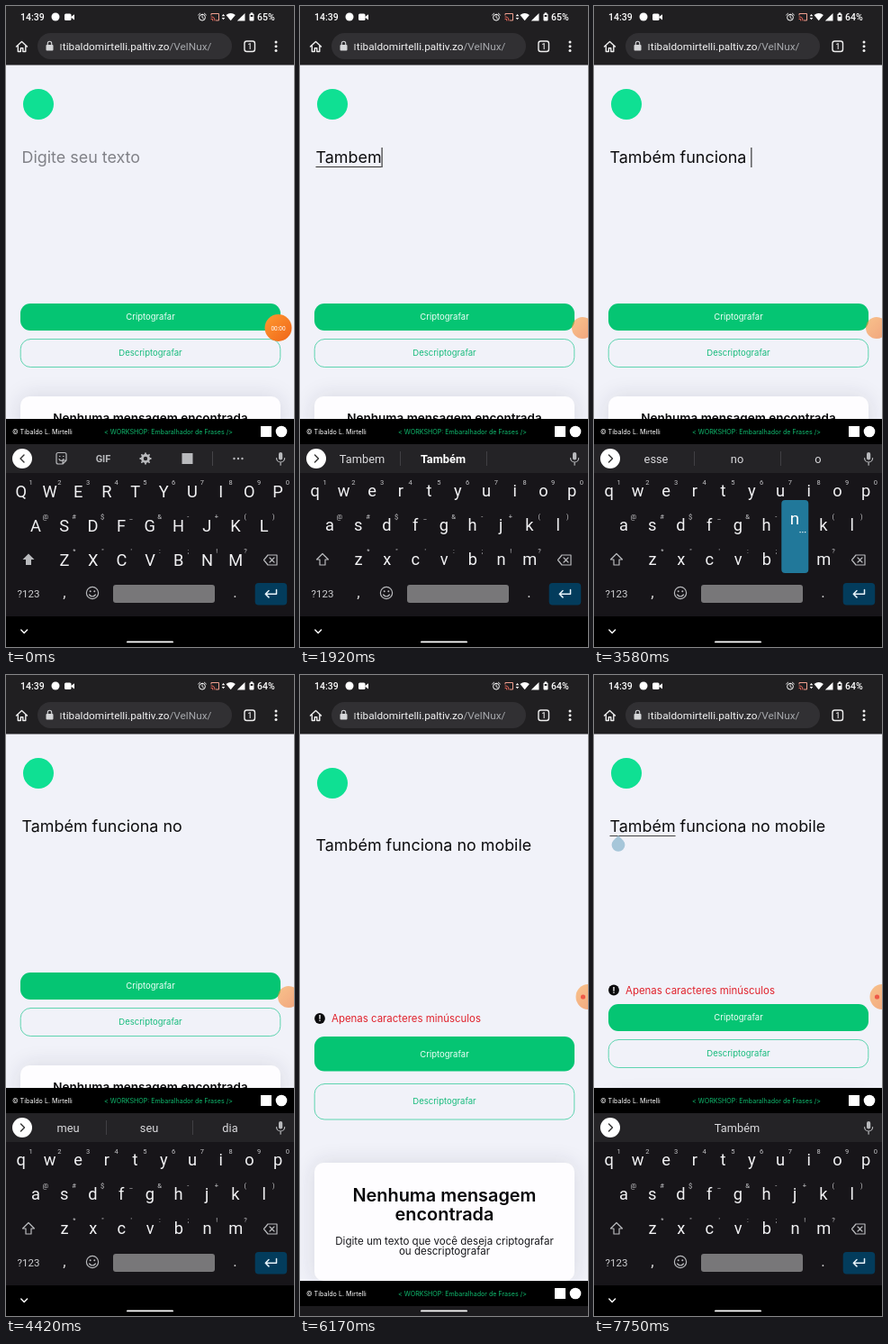
An HTML page with a canvas that plays this animation: 320x711 px, repeating every 8000 ms.

```html
<!DOCTYPE html>
<html lang="pt-BR">
<head>
<meta charset="utf-8">
<title>Digite seu texto</title>
<style>
html, body { margin: 0; width: 100%; height: 100%; overflow: hidden; background: #000; }
canvas { display: block; width: 320px; height: 711px; }
</style>
</head>
<body>
<canvas id="stage"></canvas>
<script>
const LOOP = 8000, W = 320, H = 711;
const canvas = document.getElementById('stage');
const dpr = window.devicePixelRatio || 1;
canvas.width = W * dpr;
canvas.height = H * dpr;
const c = canvas.getContext('2d');
c.scale(dpr, dpr);
c.lineCap = c.lineJoin = 'round';

const INTER = 'Inter, sans-serif', ROBOTO = 'Roboto, sans-serif';
const BAR = '#201f21', PAGE = '#f1f2f9', GREEN = '#05c573', ICON = '#b9babd';

// [time, character, suggestions, quick tap without key preview]
const EVENTS = [
  [500, 'T', 'T|Te|Tem'], [1080, 'a', 'Ta|Tá|Também'], [1250, 'm', 'Tam|Também|Tamo'],
  [1580, 'b', 'Tamb|*Também|'], [1670, 'e', 'Tambe|*Também|'], [1830, 'm', 'Tambem|*Também|'],
  [2165, ' ', 'é|não|tem'], [2420, 'f', 'f|te|tô'], [2755, 'u', 'fu|fui|eu'],
  [2835, 'n', 'fun|fim|fui'], [3000, 'c', 'func|funciona|fun'], [3080, 'i', 'funci|funciona|função'],
  [3165, 'o', 'funcio|funciona|função'], [3250, 'n', 'funcion|funciona|funcionar'],
  [3335, 'a', 'funciona|funcionar|funcionam'], [3500, ' ', 'esse|no|o'],
  [3665, 'n', 'n|no|não'], [3750, 'o', 'no|não|nos'], [3830, ' ', 'meu|dia|celular'],
  [4080, '', 'meu|seu|dia'], [4665, 'm', 'm|meu|mesmo'], [4750, 'o', 'mo|momento|modo'],
  [4915, 'b', 'mob|mobile|mon', 1], [5000, 'i', 'mobi|mobile|mobília'],
  [5080, 'l', 'mobil|mobile|mobília', 1], [5245, 'e', 'mobile'], [7420, '', 'Também']
];
const PRESS = 88, ERROR = 5750, CLOSED = 5830, TOUCH = 7250, REOPEN = 7580;

const LAYOUTS = {
  typing: { logo: 109, text: 174, top: 330, h: 30, top2: 369.5, h2: 31, card: 433, foot: 458 },
  error: { logo: 109, text: 174, err: 349.5, top: 365, h: 30, top2: 404.5, h2: 31, card: 469, foot: 458 },
  full: { logo: 120, text: 195, err: 381, top: 401, h: 38.5, top2: 453.5, h2: 39.5, card: 541, foot: 672 }
};

const ROWS = [
  { keys: 'qwertyuiop', hints: '1234567890', x: 16.8, y: 543.6 },
  { keys: 'asdfghjkl', hints: '@#$_&-+()', x: 33, y: 581.6 },
  { keys: 'zxcvbnm', hints: '*"\':;!?', x: 65, y: 619.8 }
];
const STEP = 31.7;

const span = (t, a, b) => Math.min(1, Math.max(0, (t - a) / (b - a)));
const mix = (a, b, p) => a + (b - a) * p;

function fill(d, color) { c.fillStyle = color; c.fill(new Path2D(d)); }
function line(d, color, width = 1.2) {
  c.strokeStyle = color;
  c.lineWidth = width;
  c.stroke(new Path2D(d));
}
function rect(x, y, w, h, color) { c.fillStyle = color; c.fillRect(x, y, w, h); }
function round(x, y, w, h, r, color, stroke) {
  c.beginPath();
  c.roundRect(x, y, w, h, r);
  if (stroke) { c.strokeStyle = color; c.lineWidth = stroke; c.stroke(); }
  else { c.fillStyle = color; c.fill(); }
}
function disc(x, y, r, color, stroke) {
  round(x - r, y - r, 2 * r, 2 * r, r, color, stroke);
}
function text(s, x, y, font, color, align = 'left') {
  c.font = font;
  c.fillStyle = color;
  c.textAlign = align;
  c.fillText(s, x, y);
  return c.measureText(s).width;
}

function drawBrowser(t) {
  rect(0, 0, W, 65.5, BAR);
  text('14:39', 16, 16, '500 10.5px ' + ROBOTO, '#fff');
  disc(55, 12, 4.5, '#fff');
  round(65, 8.5, 7.5, 7.5, 1.5, '#fff');
  fill('M72 12.2l4-3v6.2l-4-3z', '#fff');
  disc(218, 12.7, 3.4, '#fff', 1);
  line('M218 10.8v2l1.5 1M213.6 10l2-1.8M222.4 10l-2-1.8', '#fff', .9);
  line('M228 10v-1.5h8.5v7.5h-3', '#f0a090', 1);
  line('M228 12a4 4 0 0 1 4 4M228 14.2a1.8 1.8 0 0 1 1.8 1.8', '#e8685a', 1.1);
  fill('M239.7 11.3l1.8-2.3 1.8 2.3zM239.7 13l1.8 2.3 1.8-2.3z', '#fff');
  fill('M244.5 10q5.2-3.8 10.4 0l-5.2 6.2z', '#fff');
  fill('M265.5 8v8.4h-8.7z', '#fff');
  round(270.5, 8.5, 5, 8, 1, '#fff');
  rect(271.8, 7.4, 2.4, 1.5, '#fff');
  rect(271.7, 10, 2.6, 2, BAR);
  text(t < 2000 ? '65%' : '64%', 279, 16, '500 10.5px ' + ROBOTO, '#fff');

  line('M11.5 45l6-5.5 6 5.5M13.3 44v6.5h3v-3.7h2.5v3.7h3V44', '#eee', 1.4);
  round(35, 30, 216, 29, 14.5, '#313033');
  round(44.5, 43, 8, 6.5, 1, '#d5d6d8');
  line('M46.3 43v-1.6a2.2 2.2 0 0 1 4.4 0V43', '#d5d6d8', 1.1);
  rect(60.5, 42, 1, 7, '#ddd');
  const host = text('tibaldomirtelli.paltiv.zo', 62.8, 49, '11.8px ' + ROBOTO, '#f2f2f3');
  text('/VelNux/', 62.8 + host, 49, '11.8px ' + ROBOTO, '#a5a7ab');
  round(265, 39, 11.5, 11.5, 2.5, '#eee', 1.4);
  text('1', 270.8, 48, '500 8.5px ' + ROBOTO, '#eee', 'center');
  for (const y of [40, 44.7, 49.4]) disc(300, y, 1.5, '#eee');
}

function drawMessage(t, y) {
  const font = '17.92px ' + INTER;
  const done = EVENTS.filter(e => e[1] && t >= e[0]);
  const typed = done.map(e => e[1]).join('').replace('Tambem ', 'Também ');
  if (!typed) {
    text('Digite seu texto', 17.5, y, font, '#808187');
    return;
  }
  const width = text(typed, 17.5, y, font, '#0c0c0e');
  const measure = s => c.measureText(s).width;
  if (t < ERROR) {
    const start = measure(typed.slice(0, typed.lastIndexOf(' ') + 1));
    if (width > start) rect(17.5 + start, y + 4, width - start, 1, '#333');
    if ((t - done[done.length - 1][0]) % 1000 < 500) rect(17.5 + width, y - 17, 1, 22, '#111');
  }
  if (t >= 7420) rect(17.5, y + 4, measure('Também'), 1, '#444');
  if (t >= TOUCH) {
    if (t < 7750) rect(26.5, y - 17, 1, 21, '#111');
    fill(`M27 ${y + 4}l5.4 5.4a7.4 7.4 0 1 1 -10.8 0z`, '#a6c6d9');
  }
}

function drawPage(t, L) {
  const small = '9.5px ' + INTER, mid = 160.5;
  rect(0, 65, W, H - 65, PAGE);
  disc(36, L.logo, 17, '#0fe093');
  drawMessage(t, L.text);
  if (L.err) {
    disc(22, L.err, 5.9, '#0b0b0d');
    text('!', 22, L.err + 3.3, '700 9px ' + INTER, '#fff', 'center');
    text('Apenas caracteres minúsculos', 35, L.err + 4, '11.45px ' + INTER, '#e0222c');
  }
  round(16, L.top, 289, L.h, 11, GREEN);
  text('Criptografar', mid, L.top + L.h / 2 + 3.3, small, '#f2fff9', 'center');
  round(16.2, L.top2, 288.6, L.h2, 11, '#5fd4b0', 1);
  text('Descriptografar', mid, L.top2 + L.h2 / 2 + 3, small, '#16bb7c', 'center');

  c.save();
  c.shadowColor = 'rgba(30,30,60,.13)';
  c.shadowBlur = 24 * dpr;
  round(16, L.card, 289, 131, 10, '#fefdff');
  c.restore();
  if (L === LAYOUTS.full) {
    const title = '600 19.9px ' + INTER, body = '11.55px ' + INTER;
    text('Nenhuma mensagem', mid, 584, title, '#08080a', 'center');
    text('encontrada', mid, 605, title, '#08080a', 'center');
    text('Digite um texto que você deseja criptografar', mid, 631.5, body, '#18181c', 'center');
    text('ou descriptografar', mid, 642.5, body, '#18181c', 'center');
  } else {
    text('Nenhuma mensagem encontrada', mid, L.card + 29.3, '600 13.5px ' + INTER, '#08080a', 'center');
  }

  const f = L.foot;
  rect(0, f, W, 28, '#000');
  rect(0, f + 28, W, H - f - 28, '#1c1b1e');
  text('© Tibaldo L. Mirtelli', 7, f + 16.7, '7.2px ' + INTER, '#fff');
  text('< WORKSHOP: Embaralhador de Frases />', 180.5, f + 16.7, '7.1px ' + INTER, '#10bd70', 'center');
  rect(283, f + 8, 12, 12, '#fff');
  disc(306, f + 14, 6.3, '#fff');
}

function drawBall(t) {
  const p = span(t, 1000, 1250), late = t >= 5580;
  const x = late ? 320.5 : mix(302.5, 314, p), r = late ? 14 : mix(15, 12, p);
  const g = c.createLinearGradient(x - r, 357 - r, x + r, 357 + r);
  g.addColorStop(0, '#ff9b32');
  g.addColorStop(1, '#ef6418');
  c.globalAlpha = mix(1, .55, p);
  disc(x, 357, r, g);
  c.globalAlpha = 1;
  if (p === 0) text('00:00', x, 359.5, '6.5px ' + ROBOTO, '#fff', 'center');
  if (late) disc(314.5, 357, 2.6, '#ee5a48');
}

function drawToolbar() {
  line('M20 498l-4 4 4 4', '#333', 1.4);
  line('M56 497.5a2 2 0 0 1 2-2h7a2 2 0 0 1 2 2v6.5l-4 4h-5a2 2 0 0 1-2-2zM67 504h-2.5a1.5 1.5 0 0 0-1.5 1.5v2.5M59 502.5a2.6 2.6 0 0 0 5 0M59.5 499.5h.5M63.5 499.5h.5', ICON, 1.2);
  text('GIF', 108, 506, '700 11px ' + ROBOTO, ICON, 'center');
  disc(155, 502, 3.6, ICON, 2.8);
  for (let i = 0; i < 8; i++) {
    const a = i * Math.PI / 4, x = Math.cos(a), y = Math.sin(a);
    line(`M${155 + 5 * x} ${502 + 5 * y}L${155 + 5.8 * x} ${502 + 5.8 * y}`, ICON, 1.8);
  }
  rect(195.5, 496, 12, 12, ICON);
  rect(229, 494, 1, 16, '#454448');
  for (const x of [253.5, 258, 262.5]) disc(x, 502, 1.2, ICON);
}

function drawSuggestions(words) {
  line('M16.5 498l4 4-4 4', '#333', 1.4);
  const single = words.length === 1;
  words.forEach((w, i) => {
    const bold = w[0] === '*';
    const font = (bold ? '700 ' : '') + '12.8px ' + ROBOTO;
    text(w.replace('*', ''), single ? 159 : 69 + 90 * i, 506.5, font, bold ? '#fff' : '#d9d9dc', 'center');
  });
  if (!single) for (const x of [111, 207]) rect(x, 494, 1, 16, '#414044');
}

function drawKeys(t) {
  const caps = t < EVENTS[0][0];
  const next = EVENTS.find(e => e[1] && !e[3] && t < e[0] && t >= e[0] - PRESS);
  const held = next ? next[1].toLowerCase() : '';
  const show = k => caps ? k.toUpperCase() : k;

  for (const row of ROWS) [...row.keys].forEach((k, i) => {
    const x = row.x + STEP * i;
    text(show(k), x, row.y + (caps ? 1.2 : 0), '18.3px ' + ROBOTO, '#f1f1f3', 'center');
    text(row.hints[i], x + 10.8, row.y - 12.6, '7.5px ' + ROBOTO, '#c6c6c9', 'center');
  });

  const shift = 'M25 607.5l6.5 6.5h-3.5v6h-6v-6h-3.5z';
  if (caps) fill(shift, ICON); else line(shift, ICON, 1.2);
  line('M286.5 614.5l4.5-5.5h10v11h-10zM293 612l5 5M298 612l-5 5', ICON, 1.2);

  text('?123', 25, 655.5, '11.5px ' + ROBOTO, '#cfcfd2', 'center');
  text(',', 65, 656, '17px ' + ROBOTO, '#ddd', 'center');
  text('.', 254.5, 656, '17px ' + ROBOTO, '#ddd', 'center');
  disc(96, 651, 6.6, ICON, 1.2);
  disc(93.7, 649.3, 1, ICON);
  disc(98.3, 649.3, 1, ICON);
  line('M92.6 653q3.4 4 6.8 0', ICON, 1.2);
  round(119, 642, 113, 20, 3, held === ' ' ? '#979798' : '#787779');
  round(276.7, 640, 35.5, 24.5, 4, '#033c5c');
  line('M300.5 647.5v4.7h-12M292 648.5l-3.7 3.7 3.7 3.7', '#e8f3fa', 1.5);

  for (const row of ROWS) {
    const i = held ? row.keys.indexOf(held) : -1;
    if (i < 0) continue;
    const x = row.x + STEP * i;
    round(x - 15.2, row.y - 71.8, 30, 81, 4, '#21789a');
    text(show(held), x - .5, row.y - 45, '19px ' + ROBOTO, '#fff', 'center');
    for (const d of [5, 7.8, 10.6]) rect(x + d, row.y - 36.8, 1.2, 1.2, '#fff');
  }
}

function drawKeyboard(t) {
  rect(0, 486, W, 32, '#242326');
  rect(0, 518, W, 159, '#171519');
  rect(0, 677, W, 260, '#000');
  disc(18, 502, 11, '#fff');
  const past = EVENTS.filter(e => t >= e[0]);
  if (past.length) drawSuggestions(past[past.length - 1][2].split('|'));
  else drawToolbar();
  round(303, 495, 4.2, 8.5, 2.1, ICON);
  line('M300.6 501.5a4.5 4.5 0 0 0 9 0M305.1 506v3.2', ICON, 1.2);
  drawKeys(t);
  line('M16.8 692l3.4 3.4 3.4-3.4', '#fff', 1.4);
}

function draw(t) {
  const full = t >= CLOSED && t < REOPEN;
  const layout = full ? LAYOUTS.full : t < ERROR ? LAYOUTS.typing : LAYOUTS.error;
  drawPage(t, layout);
  drawBall(t);
  drawBrowser(t);
  // keyboard slides out after the click and back in after the touch
  const away = t < 7000 ? span(t, 5700, 6000) : 1 - span(t, 7380, 7740);
  if (away < 1) {
    c.save();
    c.translate(0, 225 * away * away * (3 - 2 * away));
    drawKeyboard(t);
    c.restore();
  }
  round(134, 704.5, 52, 1.8, .9, '#fff');
}

function frame(now) {
  draw(now % LOOP);
  requestAnimationFrame(frame);
}
requestAnimationFrame(frame);
</script>
</body>
</html>
```
